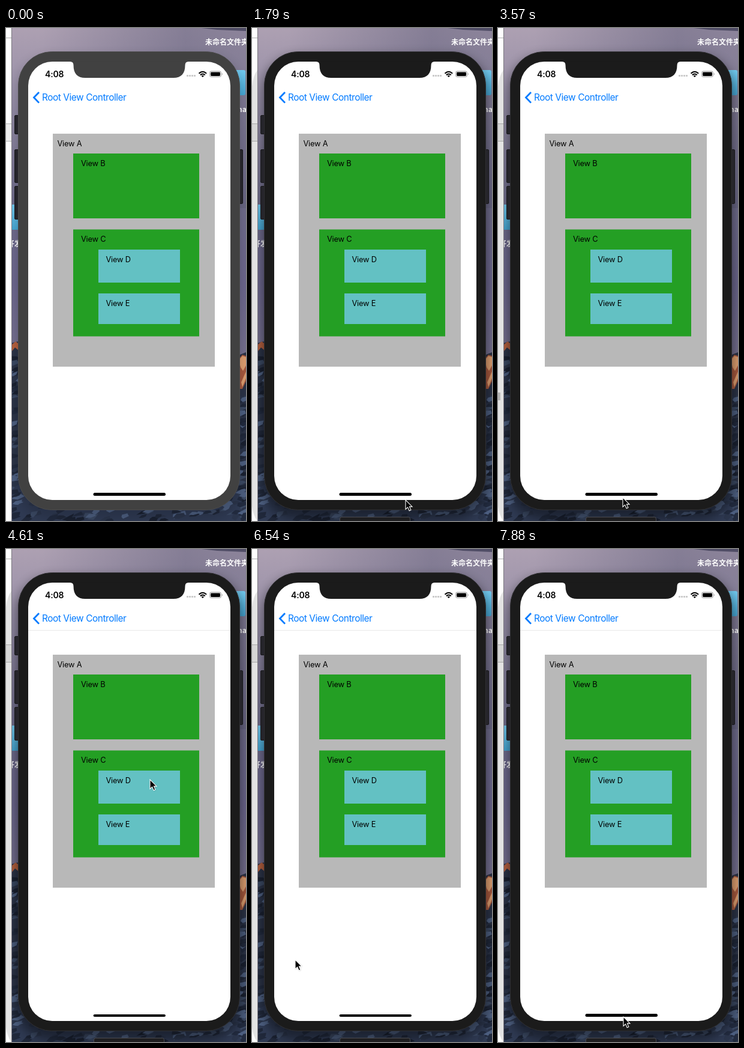
Recreate the animation shown at these times as an HTML page. Size 400 by 821 pixels, loop 8 s.

```html
<!DOCTYPE html>
<html lang="en">
<head>
<meta charset="utf-8">
<style>
html, body { margin: 0; width: 100%; height: 100%; overflow: hidden; background: #57526c; }
svg { display: block; width: 100%; height: 100%; }
text { font-family: Inter, sans-serif; }
.cjk text { font: 600 12px "Noto Sans CJK SC", "Noto Sans CJK", sans-serif; fill: #fff; }
.nav { font-size: 15.4px; letter-spacing: -.43px; fill: #007aff; }
.label { font-size: 12.8px; letter-spacing: -.22px; }
</style>
</head>
<body>
<svg viewBox="0 0 400 821" preserveAspectRatio="none">
  <defs>
    <linearGradient id="sky" x2="0" y2="1">
      <stop offset="0" stop-color="#ada0b2"/>
      <stop offset=".15" stop-color="#958da6"/>
      <stop offset=".35" stop-color="#706d8c"/>
      <stop offset=".52" stop-color="#6c678e"/>
      <stop offset=".66" stop-color="#75708f"/>
    </linearGradient>
    <linearGradient id="dusk">
      <stop offset=".15" stop-color="#5d5b78" stop-opacity="0"/>
      <stop offset=".75" stop-color="#5d5b78" stop-opacity=".5"/>
      <stop offset="1" stop-color="#5d5b78" stop-opacity=".4"/>
    </linearGradient>
    <linearGradient id="folder" x2="0" y2="1">
      <stop offset="0" stop-color="#72c9ee"/>
      <stop offset="1" stop-color="#45a6d3"/>
    </linearGradient>
    <filter id="blur" x="-20%" y="-20%" width="140%" height="140%"><feGaussianBlur stdDeviation="9"/></filter>
    <filter id="soft" x="-50%" y="-50%" width="200%" height="200%"><feGaussianBlur stdDeviation="1"/></filter>
    <clipPath id="desk"><rect x="10" width="390" height="821"/></clipPath>
  </defs>

  <g clip-path="url(#desk)">
    <rect width="400" height="821" fill="url(#sky)"/>
    <rect width="400" height="300" fill="url(#dusk)"/>
    <path d="M326 0H400V5L352 3Z" fill="#504d66"/>
    <path d="M0 527L20 522V821H0ZM380 548L400 540V821H380Z" fill="#2b3347"/>
    <rect y="760" width="400" height="61" fill="#2f3a53"/>
    <path d="M10 527L16 522L20 525V536L15 532L10 538Z" fill="#b5603f"/>
    <path d="M388 551L394 544L400 546V588L394 601L388 601Z" fill="#a85a3f"/>
    <path d="M388 553L394 546L400 548V562L395 571L391 565ZM392 590L400 572V583L394 598Z" fill="#e0a071"/>
    <g id="rocks"></g>
    <rect x="377" y="70" width="22" height="42" rx="3" fill="url(#folder)"/>
    <rect x="-5" y="294" width="40" height="42" rx="3" fill="url(#folder)"/>
    <g class="cjk">
      <text x="332" y="28">未命名文件夹</text>
      <text x="386" y="140">na</text>
      <text x="2" y="364">开发</text>
    </g>
    <rect id="shadow" x="16" y="46" width="378" height="772" rx="60" filter="url(#blur)"/>
  </g>

  <rect width="9" height="821" fill="#fdfdfd"/>
  <rect y="160" width="9" height="28" fill="#ededed"/>
  <path d="M0 16.5H9M0 159.5H9M0 188.5H9" stroke="#b4b4b4"/>
  <path id="halo" d="M0 98Q2 79 9 70V821Q2 812 0 796Z" fill="#777" opacity=".2"/>
  <path d="M9.5 0V821" stroke="#77747c"/>
  <rect id="marker" y="607" width="4" height="13" fill="#b5b5b5"/>

  <g fill="#25242a" stroke="#18181b">
    <rect x="14.5" y="145.5" width="8" height="31" rx="1.5"/>
    <rect x="14.5" y="202.5" width="8" height="55" rx="1.5"/>
    <rect x="14.5" y="263.5" width="8" height="55" rx="1.5"/>
    <rect x="386.5" y="202.5" width="8" height="90" rx="1.5"/>
  </g>
  <rect id="bezel" x="20.5" y="39.5" width="369" height="763" rx="56"/>
  <rect x="37" y="56" width="337" height="730" rx="40" fill="#fff"/>
  <path id="notch" d="M107 55.5V56Q112.5 56 112.5 62C112.5 76 119 83 132 83H279C292 83 298.5 76 298.5 62Q298.5 56 304 56V55.5Z"/>

  <text x="65" y="82" font-size="14" font-weight="600" letter-spacing="-.15">4:08</text>
  <path d="M301 79.5H316" stroke="#c4c4c4" stroke-width="2.4" stroke-dasharray="3 1"/>
  <path d="M321.5 75.8Q327.8 69.8 334.1 75.8M323.8 78.3Q327.8 74.6 331.8 78.3" fill="none" stroke="#000" stroke-width="2"/>
  <path d="M325.6 79.7Q327.8 77.9 330 79.7L327.8 82Z"/>
  <rect x="339.5" y="72" width="19" height="9.4" rx="2.6" fill="none" stroke="#999"/>
  <rect x="341" y="73.5" width="16" height="6.4" rx="1.4"/>
  <path d="M360 75Q362 76.7 360 78.4Z" fill="#999"/>

  <path d="M55 107L46.5 115.8L55 124.6" fill="none" stroke="#007aff" stroke-width="2.8"/>
  <text class="nav" x="60" y="121">Root View Controller</text>
  <rect id="hairline" x="37" y="135" width="337" height="1" fill="#e9e9e9"/>

  <g id="views"></g>
  <rect id="home" x="145.5" width="120.5" rx="2.5"/>
  <path id="strip" d="M146.5 822V817.5Q146.5 814.5 149.5 814.5H260.5Q263.5 814.5 263.5 817.5V822" fill="#1e1e20" stroke="#4b4b50"/>

  <g id="cursor">
    <path d="M0 1V16L4 12.5L6.5 18.5L9.5 17.2L7 11.5H12Z" opacity=".3" filter="url(#soft)"/>
    <path d="M0 0V15.5L3.6 12.1L6.2 18L8.9 16.8L6.4 11.1H11Z" fill="#000" stroke="#fff" stroke-width="1.1"/>
  </g>
</svg>
<script>
const LOOP = 8000, STEP = 148;
const $ = id => document.getElementById(id);
const show = (id, on) => $(id).setAttribute('display', on ? 'inline' : 'none');

function set(id, attrs) {
  for (const name in attrs) $(id).setAttribute(name, attrs[name]);
}

// name, x, y, width, height, fill, label inset
const views = [
  ['A', 78, 176, 270, 388, '#b8b8b8', 7.5],
  ['B', 112, 209, 210, 108, '#249f24', 13],
  ['C', 112, 335.5, 210, 178, '#249f24', 13],
  ['D', 154, 369, 136, 55, '#63c1c3', 12.5],
  ['E', 154, 442, 136, 51, '#63c1c3', 12.5]
];
$('views').innerHTML = views.map(([name, x, y, w, h, fill, inset]) =>
  `<rect x="${x}" y="${y}" width="${w}" height="${h}" fill="${fill}"/>` +
  `<text class="label" x="${x + inset}" y="${y + 20.7}">View ${name}</text>`).join('');

let seed = 11;
const rand = () => (seed = seed * 16807 % 2147483647) / 2147483647;
const tones = ['#1a2131', '#20283a', '#2b354b', '#3b4963', '#4d5f80', '#222b3f'];

// A slanted shard of stone
function rock(x, y) {
  const points = Array.from({ length: 5 }, (_, i) => {
    const a = i * 1.257, r = 2 + rand() * 5, dy = Math.sin(a) * r;
    return `${(x + Math.cos(a) * r * 1.6 - dy * .8).toFixed(1)},${(y + dy).toFixed(1)}`;
  });
  return `<polygon points="${points.join(' ')}" fill="${tones[Math.floor(rand() * tones.length)]}"/>`;
}

let rocks = '';
for (let i = 0; i < 130; i++) rocks += rock(10 + rand() * 390, 765 + rand() * 56);
for (let i = 0; i < 55; i++) {
  rocks += rock(10 + rand() * 12, 545 + rand() * 270);
  rocks += rock(390 + rand() * 10, 606 + rand() * 210);
}
$('rocks').innerHTML = rocks;

// Each pointer move: start time, then one position per step
const moves = [
  [1340, [[318, 800], [284, 792], [256, 786]]],
  [2230, [[257, 770], [262, 680], [265, 540], [252, 434], [237, 500], [225, 640], [212, 755], [208, 782]]],
  [3720, [[213, 690], [224, 510], [235, 375]]],
  [4610, [[240, 384], [272, 420], [312, 500], [331, 590], [322, 680], [304, 760], [294, 808], null]],
  [6390, [[29, 778], [72, 684], [132, 545], [198, 430], [227, 401], [217, 560], [214, 615], [214, 646]]],
  [7580, [[212, 730], [210, 790], [209, 779]]]
];

function pointer(t) {
  let at = null;
  for (const [start, path] of moves) {
    if (t < start) break;
    at = path[Math.min(path.length - 1, Math.floor((t - start) / STEP))];
  }
  return at;
}

function draw(t) {
  const active = t >= 1790;
  const shell = active ? '#1b1b1b' : '#414141';
  const thin = t >= 4610 && t < 7580;
  set('bezel', { fill: shell, stroke: active ? '#303033' : '#4b4b4b' });
  set('notch', { fill: shell });
  set('shadow', { opacity: active ? .4 : .15 });
  set('home', { y: thin ? 775 : 774, height: thin ? 4 : 5 });
  show('halo', active);
  show('strip', t >= 1640);
  show('marker', t >= 3420 && t < 4610);
  show('hairline', t >= 4610);
  const at = pointer(t);
  show('cursor', at);
  if (at) set('cursor', { transform: `translate(${at})` });
}

const begin = performance.now();
function tick() {
  draw((performance.now() - begin) % LOOP);
  requestAnimationFrame(tick);
}
tick();
</script>
</body>
</html>
```
